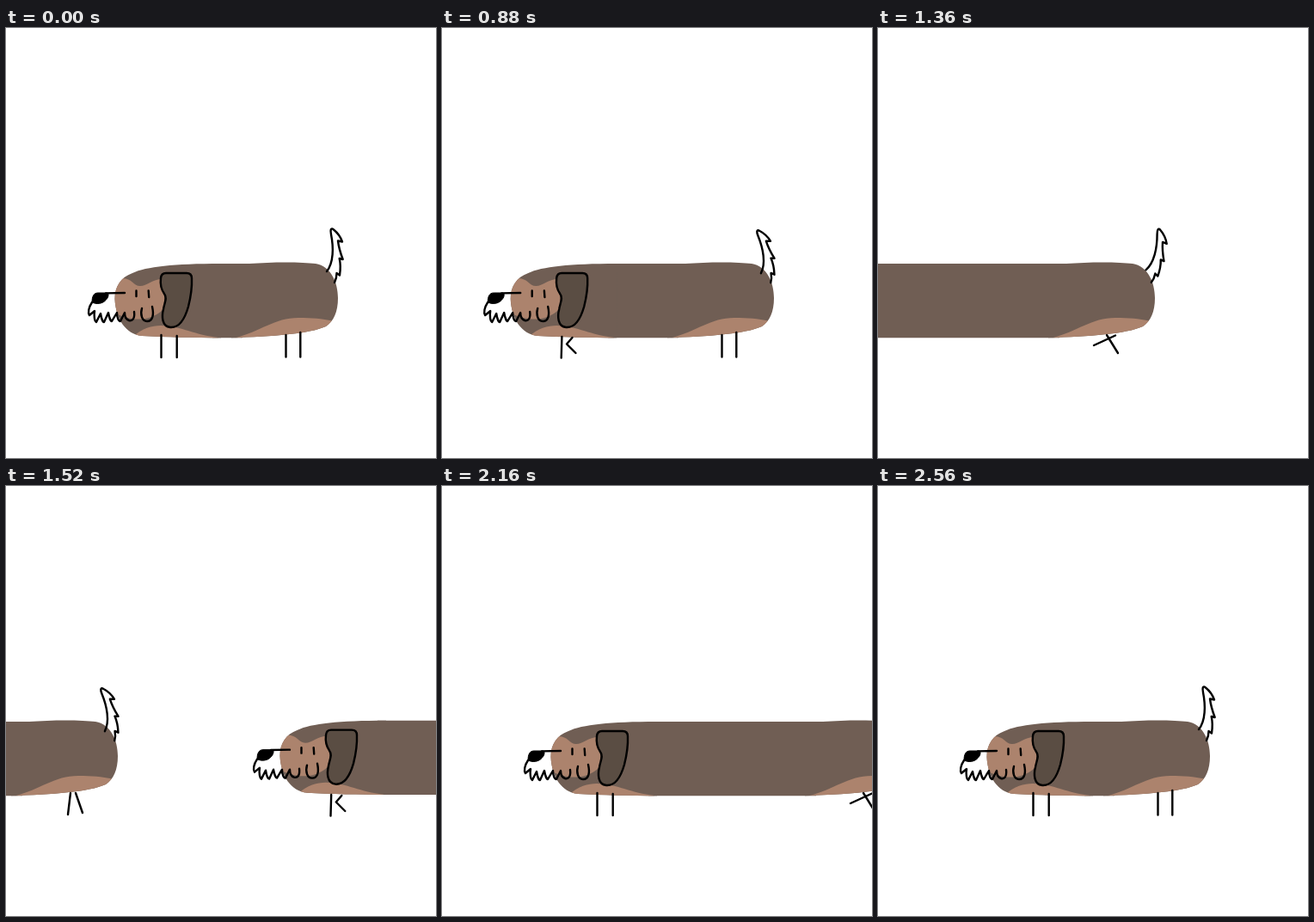
Write an HTML page that moves like this. It is 500 by 500 pixels and loops after 2.8 s.

```html
<!DOCTYPE html>
<html lang="en">
<head>
<meta charset="utf-8">
<title>Long dog</title>
<style>
  html, body { margin: 0; width: 100%; height: 100%; overflow: hidden; background: #fff; }
  svg { display: block; width: 100vw; height: 100vh; }
  .coat { fill: #705e54; }
  .tan { fill: #ac836d; }
  .ink { fill: none; stroke: #000; stroke-width: 2.4; stroke-linecap: round; stroke-linejoin: round; }
  .ink .ear { fill: #5a4d43; }
</style>
</head>
<body>
<svg viewBox="0 0 500 500">
  <defs>
    <path id="chest" d="M250 274C195 274 163 277.5 147 285C133 290 126.5 301 126.5 315C127.5 338 139 356 158 358C185 359.3 220 360.3 250 360.3Z"/>
    <path id="rump" d="M262 274H283C310 271.8 345 272 360 274C378 277 386 296 386 314C386 330 381 341 372 347C352 356 310 358.5 262 360.3Z"/>
    <clipPath id="inChest"><use href="#chest"/></clipPath>
    <clipPath id="inRump"><use href="#rump"/></clipPath>
  </defs>

  <path id="trunk" class="coat"/>

  <g id="rear">
    <use href="#rump" class="coat"/>
    <path class="tan" clip-path="url(#inRump)" d="M266 360.5C296 353 312 337 340 337C356 337 367 338 380 340.5V370H266Z"/>
    <g class="ink">
      <path id="hindLegs"/>
      <path id="tail" d="M373 283C381 273 381 255 378 240C377 235 377.5 231.5 381 234.5C386 238.5 389 243 391 248.5L386 247.5C387 256 389 262 391.7 269L387.7 268C389.5 276 389 281 388 287.5L384.5 285C384.5 289 384 292 382 296"/>
    </g>
  </g>

  <g id="head">
    <use href="#chest" class="coat"/>
    <g class="tan" clip-path="url(#inChest)">
      <path d="M120 291H134C146 290 148 300 156 300C164 300 170 292 182 292L187 318C185 328 178 332 169 336C155 341 140 338 128 332H120Z"/>
      <path d="M148 359C158 349 170 346 180 346C205 347 220 357 247 360V370H148Z"/>
    </g>
    <g class="ink">
      <path d="M100 319C96 325 95 331 97 334L103 329C102 335 103 341 105 342L110 332C111 339 113 342 114 342L119 331C120 337 122 341 123 341L129 331C129 337 131 341 133 341L138 331C138 336 140 339 143 340C147 341 150 338 149 330"/>
      <path d="M158 326C156 333 158 341 164 341C171 341 172 333 170 324"/>
      <path d="M116 308.4L138 308M151.5 305.5V312M165.7 305.5L166.2 313"/>
      <path style="fill:#000;stroke-width:1" d="M100 319C100 312 102 308 107 308H118C120 309.5 119 313.5 116 316.5C112 321 105 321.5 100 319Z"/>
      <path class="ear" d="M186 285Q180.5 285 180 291C179 299 180.5 304 184 309C188 314 184 320 183 327C181 335 181 347 191 348C202 349 208 338 212 324C215 312 216.5 302 216 291Q216 285 210 285Z"/>
    </g>
  </g>
  <g id="fore" class="ink"><path id="foreLegs"/></g>
</svg>
<script>
const STEP = 80, LOOP = 2800;
const $ = id => document.getElementById(id);

const foreStand = 'M180.5 357V383M198.7 358V383';
const foreWalk = [
  'M186 359L195 381M197 360L184 382',
  'M186 359L179 367L190 378M197 360L196 384',
  'M186 359L174 381M197 360L207 381',
  'M186.2 359L185.5 383.5M198.3 360L191.8 367.5L202.3 378'
];
const hindStand = 'M325.5 357V382.5M342.3 354V382.5';
const hindWalk = [
  'M324 355L316 365L320 374M337 356L344 379',
  'M326 356L314 379M337 356L350 376',
  'M340 357.5L315 369M330 357L343 378',
  'M331 357L319 380M338 356L333 367L344 376',
  'M331 357L328 382M337 357L345 380'
];

// Each end of the dog speeds up to leave on the left, then slows down into place.
function headShift(s) {
  if (s < 8 || s >= 23) return 0;
  return s <= 15 ? -5.2 * (s - 8) ** 2 : 12 * (23 - s) ** 2;
}
function rearShift(s) {
  if (s < 15 || s >= 32) return 0;
  if (s < 23) return -16 * (s - 15) ** 2;
  return s < 27 ? 300 : 6.4 * (32 - s) ** 2;
}

const band = (a, b, y = 0) => b > a ? `M${a} ${274 + y}H${b}V${360.3 + y}H${a}Z` : '';
const shift = (id, x, y = 0) => $(id).setAttribute('transform', `translate(${x} ${y})`);

function draw(ms) {
  const s = Math.min(Math.floor(ms / STEP), 32);
  const head = headShift(s), rear = rearShift(s);
  const from = head + 240, to = rear + 275;
  const split = head > rear;
  const lift = -0.007 * Math.max(head, 0); // the returning head comes down slightly

  shift('head', head, lift);
  shift('fore', head);
  shift('rear', rear);
  $('trunk').setAttribute('d', split ? band(-10, to) + band(from, 510, lift) : band(from, to));

  const wag = 11 * [0, 1, 0, -1][s % 4];
  $('tail').setAttribute('transform', `rotate(${wag} 383 295)`);

  const foreMoving = s > 8 && s < 23;
  const hindMoving = s >= 15 && s < 32;
  $('foreLegs').setAttribute('d', foreMoving ? foreWalk[s % 4] : foreStand);
  $('hindLegs').setAttribute('d', hindMoving ? hindWalk[s % 5] : hindStand);
}

const start = performance.now();
function tick() {
  draw((performance.now() - start) % LOOP);
  requestAnimationFrame(tick);
}
tick();
</script>
</body>
</html>
```
